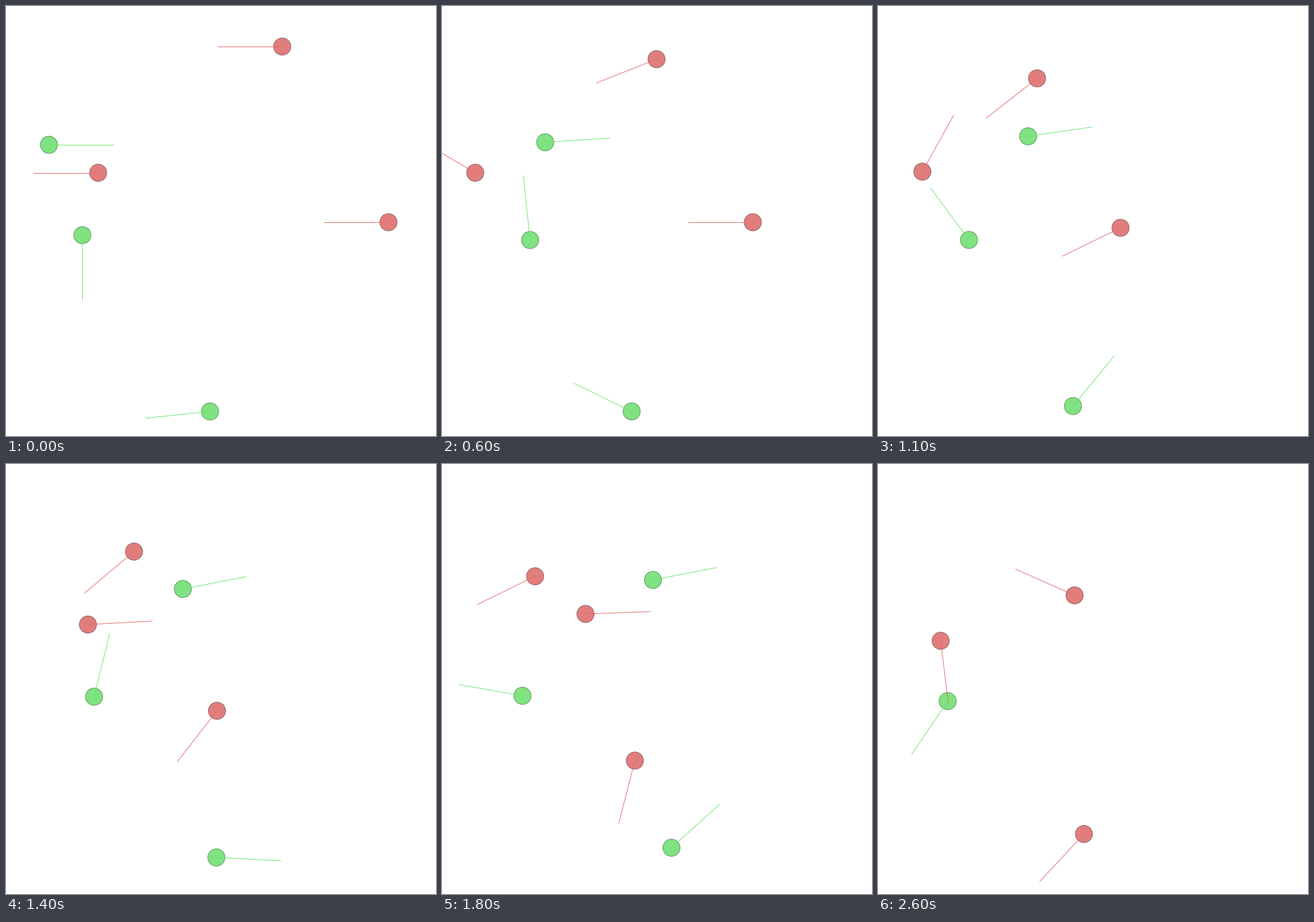
Recreate the animation shown at these times as a matplotlib script. Size 700 px wide and 700 px high, loop 2700 ms.

```python
import numpy as np
import matplotlib.pyplot as plt
from matplotlib.animation import FuncAnimation
from matplotlib.patches import Circle

SIZE, DPI = 700, 100
FRAMES, STEP = 27, 100
RADIUS, REACH = 14, 105
PX = 72 / DPI

# fill, rim, pointer
RED = ("#e27d7d", "#8c6464", "#e86c6c")
GREEN = ("#80e280", "#649664", "#6ce66c")

fig = plt.figure(figsize=(SIZE / DPI, SIZE / DPI), dpi=DPI, facecolor="white")
ax = fig.add_axes([0, 0, 1, 1])
ax.set_xlim(0, SIZE)
ax.set_ylim(SIZE, 0)
ax.axis("off")


def glide(t, start, end, a, b):
    """Ease from a to b between two times."""
    u = np.clip((t - start) / (end - start), 0, 1)
    return a + (b - a) * u * u * (3 - 2 * u)


# Paths: time in frames, place in pixels from the top left.
def drift_right(t):
    return 70 + 16.9 * t - 0.095 * t * t, 226 - 0.115 * t * t


def hover(t):
    x = 131 + 17.5 * np.cos(2 * np.pi * (t - 10) / 32)
    return x, 373 + t / 2 + 5 * np.sin(2 * np.pi * t / 26)


def dodge(t):
    x = glide(t, -3, 8, 338, 306) + glide(t, 8, 20, 0, 73)
    return x, glide(t, 6, 25, 660, 609)


def dive(t):
    return glide(t, -10, 25.5, 533, 102), 66 + 1.9 * t + 0.255 * t * t


def rebound(t):
    x = glide(t, -3, 7.5, 175.5, 47) + glide(t, 8, 24, 0, 273)
    return x, glide(t, 9, 28, 271.5, 212)


def swerve(t):
    x = glide(t, -4, 18, 652, 314) + glide(t, 18, 27, 0, 22)
    return x, glide(t, 9, 26.5, 352, 603)


class Agent:
    """A disc with a pointer; turns are (time, clockwise degrees) keys."""

    def __init__(self, colors, path, turns, life=FRAMES):
        fill, rim, ink = colors
        self.path, self.life = path, life
        self.times, self.angles = zip(*turns)
        self.disc = ax.add_patch(Circle((0, 0), RADIUS, fc=fill, ec=rim, lw=PX, zorder=1))
        self.line, = ax.plot([], [], color=ink, lw=PX, zorder=2)

    def pose(self, t):
        x, y = self.path(t)
        a = np.radians(np.interp(t, self.times, self.angles))
        self.disc.center = (x, y)
        self.line.set_data([x, x + REACH * np.cos(a)], [y, y + REACH * np.sin(a)])
        for part in (self.disc, self.line):
            part.set_visible(t < self.life)
        return self.disc, self.line


agents = [
    Agent(GREEN, drift_right, [(2, 0), (14, -11)], life=22),
    Agent(GREEN, hover, [(0, 90), (4, -15), (8, -177), (14, -76), (18, -170),
                         (24, -196), (26, -236)]),
    Agent(GREEN, dodge, [(0, 174), (4, 156), (8, 256), (14, 363), (18, 318),
                         (22, 261), (24, 360)], life=25),
    Agent(RED, dive, [(3, 180), (8, 144), (14, 140), (18, 154), (22, 107), (26, 83)]),
    Agent(RED, rebound, [(4, 180), (8, 241), (14, 357), (18, 358), (22, 332),
                         (23, 211), (26, 204)]),
    Agent(RED, swerve, [(8, 180), (14, 128), (23, 75), (26, 133)]),
]


def update(frame):
    return [part for agent in agents for part in agent.pose(frame)]


anim = FuncAnimation(fig, update, frames=FRAMES, interval=STEP, repeat=True, repeat_delay=0)
plt.show()
```
